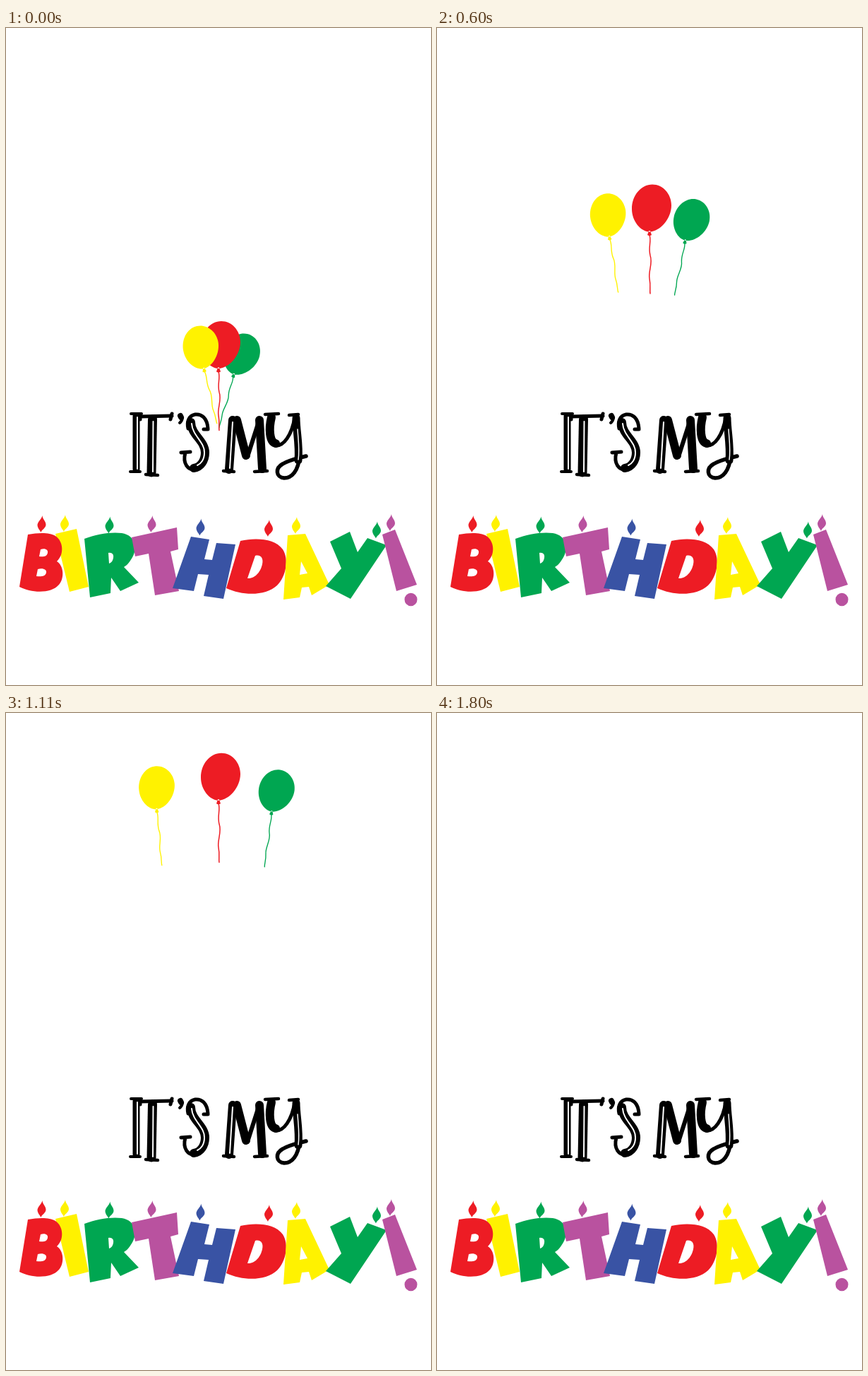
An HTML page with a canvas for the animation above (4800 ms loop, 602 by 930 pixels).

```html
<!DOCTYPE html>
<html lang="en">
<head>
<meta charset="utf-8">
<title>It's my birthday!</title>
<style>
html, body { margin: 0; width: 100%; height: 100%; overflow: hidden; background: #fff; }
canvas { display: block; }
</style>
</head>
<body>
<canvas id="stage" width="602" height="930" role="img" aria-label="It's my birthday!"></canvas>
<script>
const ctx = document.getElementById('stage').getContext('2d');
const LOOP = 4800, STEP = 30, LAST = 60;
const RED = '#ed1c24', YELLOW = '#fff200', GREEN = '#00a651', PURPLE = '#b9529f', BLUE = '#3953a4';

// Candle letters, back to front; each flame is given by its centre.
const letters = [
  { color: YELLOW, flame: [83, 701], d: 'M70 716L100 709L117 791L90 798Z' },
  { color: RED, flame: [50.5, 702], d: 'M31 717C47 714 62 714 70 719C81 726 83 745 72 755C82 761 83 779 75 788C64 801 36 800 19 791Z' +
    'M49 738C56 736 60 739 59 743C58 748 53 749 47 748ZM45 766C53 764 58 767 57 771C56 776 50 777 43 776Z' },
  { color: GREEN, flame: [146.5, 703.5], d: 'M111 723C128 716 150 713 164 715C184 718 187 738 178 751C175 756 171 761 167 763L188 785L162 797L149 778L148 800L119 806Z' +
    'M145 743C150 742 153 745 152 750C151 755 149 757 146 758Z' },
  { color: PURPLE, flame: [206.5, 702], d: 'M178 721L242 707L244 738L233 741L245 797L211 803L202 744L183 748Z' },
  { color: BLUE, flame: [275.5, 706.5], d: 'M262 720L288 724L281 752L292 753L298 729L325 731L308 808L280 804L287 774L272 773L266 797L236 793Z' },
  { color: RED, flame: [372, 708], d: 'M332 726C355 721 381 723 392 738C401 752 397 776 384 789C368 804 336 804 312 793Z' +
    'M353 747C361 745 365 751 363 759C361 769 353 780 342 779Z' },
  { color: YELLOW, flame: [411, 704], d: 'M399 718L424 716L458 788L433 803L429 791L419 792L416 806L393 809Z' +
    'M418 755L427 772L416 774Z' },
  { color: GREEN, flame: [525, 710.5], d: 'M459 727L487 713L498 742L512 722L539 732L488 808L453 790L475 765Z' },
  { color: PURPLE, flame: [545, 700], d: 'M533 717L551 710L582 788L553 797Z' +
    'M582.5 809A9 9.3 0 1 0 564.5 809A9 9.3 0 1 0 582.5 809Z' }
].map(l => ({ ...l, path: new Path2D(l.d) }));

const flame = new Path2D('M1 -12C1 -7 6 -4 6 1C6 6 0 8 -1 12C-3 8 -6 6 -6 1C-5 -4 0 -7 1 -12Z');

// Brush lettering: [width, path], then white inlines over the wide strokes.
const ink = [
  [10, 'M184.5 549L184.5 625'],
  [4, 'M177 546L192 546M176 628L190 628'],
  [5, 'M189 550L235 549'],
  [5, 'M190 547L190 554M235 546L233 554'],
  [13, 'M207.5 554L206 629'],
  [4.5, 'M198 632L215 633'],
  [8, 'M247 549L248 551'],
  [4, 'M250 552Q249 557 246 559'],
  [5, 'M286 567C285 552 277 546 268 547C258 549 256 558 258 567M280 568L286 568'],
  [12, 'M262 558C262 576 282 584 282 601C282 613 275 622 266 623'],
  [5, 'M270 625C257 627 250 616 254 601M248 601L261 600'],
  [12, 'M321 555L316 625'],
  [4.5, 'M308 627L323 628M352 628L370 627'],
  [12, 'M327 555L340 605'],
  [6, 'M342 607L359 554'],
  [12, 'M359 555L363 624'],
  [4.5, 'M367 547L386 546M401 548L414 547'],
  [12, 'M376 551C372 567 373 586 382 588'],
  [5, 'M381 591C393 593 405 576 409 551'],
  [11, 'M411 552C411 570 416 590 414 612'],
  [5.5, 'M416 606C414 627 405 637 394 637C382 636 381 623 392 617C402 611 414 609 425 606']
].map(toStroke);
const inlines = [
  [2, 'M186 551L186 624'],
  [2, 'M208.5 557L208 628'],
  [2, 'M263 560C264 577 282 587 281 601C281 611 276 617 271 619'],
  [2, 'M321 558L317 623'],
  [1.5, 'M413 568C414 584 416 597 414 611']
].map(toStroke);

// Motion per step is a straight drift with a slow turn towards upright.
const balloons = [
  { color: GREEN, x: 333.7, y: 462, vx: 1.336, vy: -9.51, angle: 16.1, turn: -0.22, scale: 0.9 },
  { color: RED, x: 304, y: 448.5, vx: 0, vy: -9.68, angle: 0, turn: 0, scale: 1 },
  { color: YELLOW, x: 276.2, y: 452, vx: -1.69, vy: -9.36, angle: -12.8, turn: 0.22, scale: 0.91 }
];
const skin = new Path2D('M1 -33.5C16 -33.5 28 -20 28 -4C28 15 12 33 -3 33.5C-16 33 -28 18 -28 1C-28 -18 -15 -33.5 1 -33.5Z' +
  'M-4 32L-6 38Q-3 40 0 38L-2 32Z');
const string = new Path2D('M-3 38C0 47 -5 55 -2 67C2 78 -5 90 -3 100C-1 110 -3 117 -2 121');

function toStroke([width, d]) {
  return { width, path: new Path2D(d) };
}

function drawStrokes(list, color) {
  ctx.strokeStyle = color;
  for (const s of list) {
    ctx.lineWidth = s.width;
    ctx.stroke(s.path);
  }
}

function drawLetter({ color, flame: [x, y], path }) {
  ctx.fillStyle = color;
  ctx.fill(path, 'evenodd');
  ctx.save();
  ctx.translate(x, y);
  ctx.fill(flame);
  ctx.restore();
}

function drawBalloon(b, n) {
  ctx.save();
  ctx.translate(b.x + b.vx * n, b.y + b.vy * n);
  ctx.rotate((b.angle + b.turn * n) * Math.PI / 180);
  ctx.scale(b.scale, b.scale);
  ctx.fillStyle = ctx.strokeStyle = b.color;
  ctx.lineWidth = 1.5;
  ctx.fill(skin);
  ctx.stroke(string);
  ctx.restore();
}

function draw(time) {
  const n = Math.floor((time % LOOP) / STEP);
  ctx.fillStyle = '#fff';
  ctx.fillRect(0, 0, 602, 930);
  ctx.lineCap = ctx.lineJoin = 'round';
  drawStrokes(ink, '#000');
  drawStrokes(inlines, '#fff');
  letters.forEach(drawLetter);
  if (n < LAST) balloons.forEach(b => drawBalloon(b, n));
}

const start = performance.now();
function tick() {
  draw(performance.now() - start);
  requestAnimationFrame(tick);
}
tick();
</script>
</body>
</html>
```
